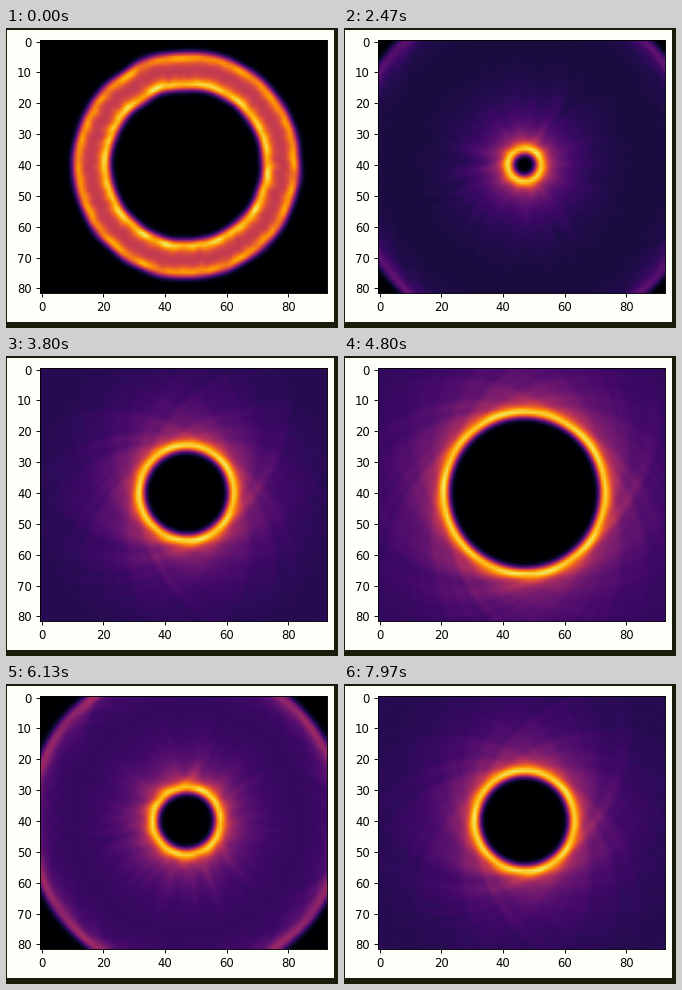
Recreate the animation shown at these times as a matplotlib script. Size 332x300 px, loop 8000 ms.

```python
import numpy as np
import matplotlib.pyplot as plt
from matplotlib.animation import FuncAnimation
from matplotlib.patches import Rectangle

W, H, DPI = 332, 300, 100
FRAMES, STEP = 200, 40  # 8000 ms loop
COLS, ROWS = 93, 82
CX, CY = 47, 40
RING, SOURCES, SIGMA = 30.7, 120, 1.1
PX = 1.165 * 72 / DPI  # points per unscaled pixel

FAST, SLOW, KNEE = 21.2, 10.8, 35.4  # cells per second, cells
START, HOLD, RESTART = 1.23, 5.0, 5.17  # seconds
PAUSE, RESUME = 6.83, 6.97

# Slightly uneven sources on a ring; each sends out a growing circle.
rng = np.random.default_rng(4)
angle = 2 * np.pi * np.arange(SOURCES) / SOURCES
radius = RING + rng.normal(0, 0.3, SOURCES)
src_x = CX + radius * np.cos(angle)
src_y = CY + radius * np.sin(angle)
grid_y, grid_x = np.mgrid[:ROWS, :COLS]
dist = np.hypot(grid_x - src_x[:, None, None],
                grid_y - src_y[:, None, None]).astype(np.float32)


def field(travel):
    """Sum of all circles of the given radius, scaled to a peak of 1."""
    circles = np.exp(-((dist - np.float32(travel)) / SIGMA) ** 2 / 2)
    total = circles.sum(axis=0)
    return total / total.max()


def run(age):
    """Distance covered: fast at first, slower past the knee."""
    fast = FAST * max(age, 0)
    return min(fast, KNEE + SLOW * (age - KNEE / FAST))


def travel_at(t):
    if t < RESTART:
        lead_in = 4.9 + 9 * min(t, 0.4)
        return max(lead_in, run(min(t, HOLD) - START))
    stalled = np.clip(t - PAUSE, 0, RESUME - PAUSE)
    return run(t - RESTART - stalled)


plt.rcParams.update({"font.family": "DejaVu Sans", "font.size": 10 * PX})
fig = plt.figure(figsize=(W / DPI, H / DPI), dpi=DPI, facecolor="#1b1b0c")
fig.add_artist(Rectangle((1 / W, 6 / H), 327 / W, 292 / H, color="#fffffa",
                         lw=0, transform=fig.transFigure, zorder=-1))

ax = fig.add_axes([34 / W, 1 - 265 / H, 287 / W, 253 / H])
image = ax.imshow(field(travel_at(0)), cmap="inferno", vmin=0, vmax=1.04,
                  aspect="auto", interpolation="bilinear")
ax.set_xticks(range(0, 81, 20))
ax.set_yticks(range(0, 81, 10))
ax.tick_params(length=3.5 * PX, width=0.8 * PX, pad=3.5 * PX)
for spine in ax.spines.values():
    spine.set_linewidth(0.8 * PX)


def draw(i):
    image.set_data(field(travel_at((i * STEP + 15) / 1000)))
    return [image]


anim = FuncAnimation(fig, draw, frames=FRAMES, interval=STEP,
                     repeat=True, repeat_delay=0, blit=False)
plt.show()
```
